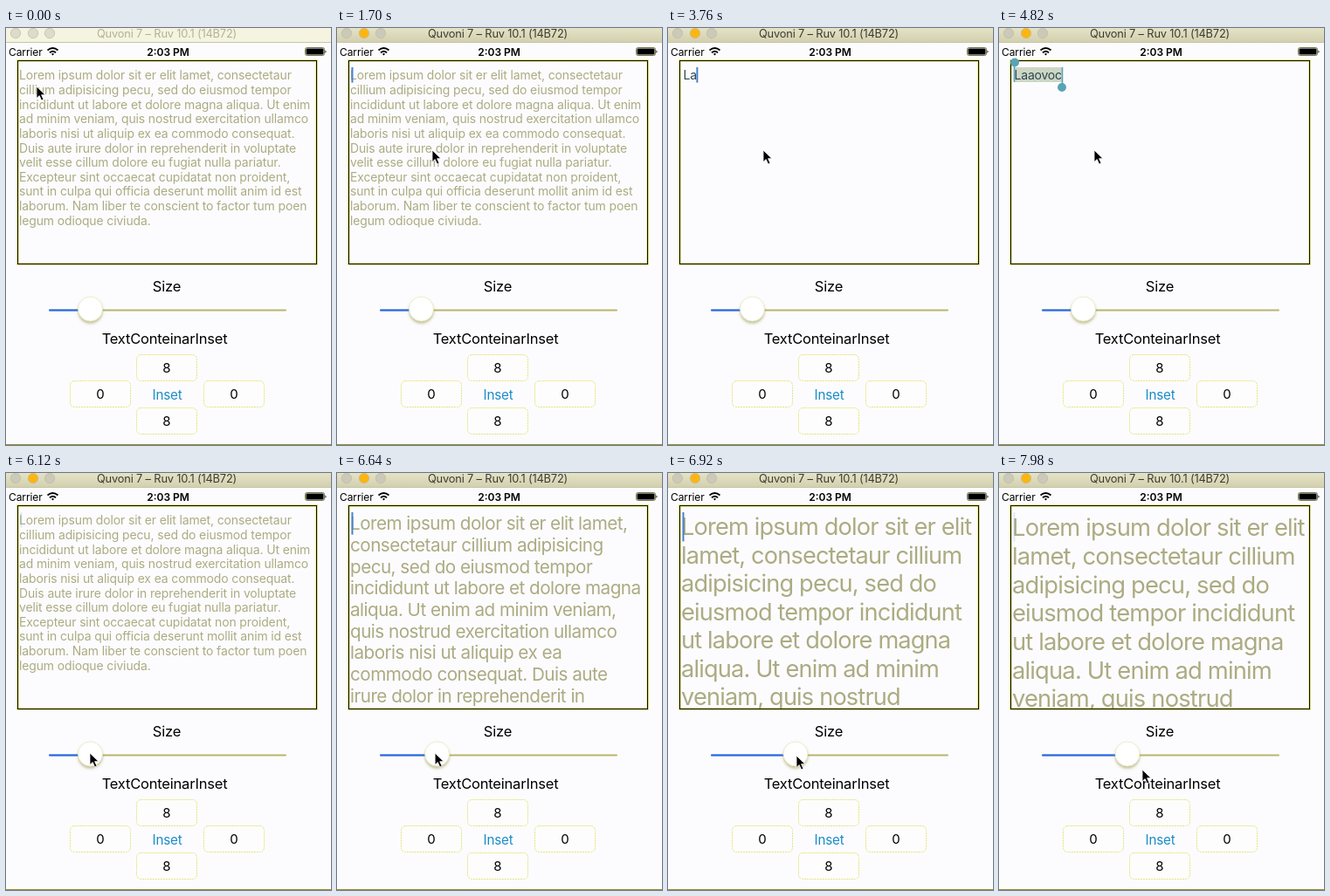
Write an HTML page that moves like this. It is 372 px wide and 478 px high and loops after 8 s.

```html
<!DOCTYPE html>
<html lang="en">
<head>
<meta charset="utf-8">
<title>Text view demo</title>
<style>
html, body { margin: 0; width: 100%; height: 100%; overflow: hidden; background: #fcfcfe; }
svg { position: absolute; left: 0; top: 0; }
text { font-family: Inter, sans-serif; }
.label { font-size: 16.5px; letter-spacing: -.012em; text-anchor: middle; }
.value { font-size: 15px; text-anchor: middle; }
text.japanese { font-family: "Noto Sans CJK JP", "Noto Sans CJK", sans-serif; }
.candidate { font-size: 20px; text-anchor: middle; }
.field { fill: #fdfdfd; stroke: #e4e482; stroke-dasharray: 2 1; }
#view { position: absolute; left: 14px; top: 39px; width: 341px; height: 231px; overflow: hidden; }
#placeholder { position: absolute; left: 1px; top: 7.4px; width: 338px; color: #acab82;
  font-family: Inter, sans-serif; line-height: 1.193; }
</style>
</head>
<body>
<svg width="372" height="478" viewBox="0 0 372 478">
  <defs>
    <linearGradient id="bar" x2="0" y2="1">
      <stop stop-color="#e5e3c6"/><stop offset="1" stop-color="#d2d0ae"/>
    </linearGradient>
    <filter id="shadow" x="-50%" y="-50%" width="200%" height="200%">
      <feDropShadow dx="0" dy="2.5" stdDeviation="1.8" flood-color="#8a8838" flood-opacity=".5"/>
    </filter>
  </defs>

  <rect id="titleBar" width="372" height="16"/>
  <path d="M0 16.5H372" stroke="#c6c5a4"/>
  <g stroke="#bcbba4" stroke-width=".7">
    <circle class="light" cx="11" cy="6" r="5.7"/>
    <circle class="light" cx="31" cy="6" r="5.7"/>
    <circle class="light" cx="50" cy="6" r="5.7"/>
  </g>
  <text id="title" x="184" y="11" font-size="12.8" letter-spacing="-.15" text-anchor="middle">Quvoni 7 – Ruv 10.1 (14B72)</text>

  <text x="3" y="31.5" font-size="12" letter-spacing="-.1">Carrier</text>
  <g fill="none" stroke="#000" stroke-width="1.8">
    <path d="M47.5 25.5q6-5 12 0M50 28.3q3.5-3 7 0"/>
    <path d="M52 29.7q1.5-1.2 3 0L53.5 31.5z" fill="#000" stroke="none"/>
  </g>
  <text x="185.5" y="31.5" font-size="12" font-weight="600" text-anchor="middle">2:03 PM</text>
  <rect x="342.5" y="22.5" width="22" height="9" rx="2" fill="none" stroke="#77774a"/>
  <rect x="343.5" y="23.5" width="20" height="7" rx="1"/>
  <path d="M365.5 25.5q2 1.6 0 3.2z"/>

  <rect x="13.5" y="37.5" width="342" height="233" fill="none" stroke="#e2e27c" stroke-width="2.6"/>
  <rect x="13.5" y="37.5" width="342" height="233" fill="none" stroke="#0c0c00"/>

  <g id="composing">
    <rect x="18" y="45" width="14" height="17" fill="#d5dcc4"/>
    <text class="japanese" x="17.5" y="59" font-size="14">あ</text>
    <path d="M32.5 45V62.5" stroke="#3973dd" stroke-width="2"/>
    <rect x="18.5" y="63.5" width="311" height="40" fill="#fcfcfc" stroke="#d6d67c"/>
    <g class="candidate">
      <text class="japanese" x="62" y="90">あっ</text>
      <text class="japanese" x="153" y="90">アッ</text>
      <text class="japanese" x="242" y="90">会っ</text>
    </g>
    <path d="M305.5 81l3.5 3.5 3.5-3.5" fill="none" stroke="#222" stroke-width="1.4"/>
  </g>

  <rect id="selection" x="17" y="45" width="55.5" height="17" fill="#cdd6c4"/>
  <text id="typed" x="17.5" y="59" font-size="14" letter-spacing="-.2" fill="#2b4650"></text>
  <g id="handles" fill="#5aa3b6" stroke="#5aa3b6" stroke-width="1.6">
    <path d="M17.5 40V62M72.5 45V68"/>
    <circle cx="18" cy="39.5" r="4.2"/><circle cx="72" cy="68" r="4.2"/>
  </g>

  <text class="label" x="184" y="302">Size</text>
  <path d="M50 323.5H320" stroke="#b9b56c" stroke-width="2" stroke-linecap="round"/>
  <path id="filled" stroke="#1f66ff" stroke-width="2" stroke-linecap="round"/>
  <circle id="thumb" cy="322" r="14" fill="#fff" stroke="#e6e5b4" stroke-width=".7" filter="url(#shadow)"/>

  <text class="label" x="181.5" y="361.5">TextConteinarInset</text>
  <g id="fields"></g>
  <text class="label" x="184.5" y="425.5" style="font-size:15.2px" fill="#1a8cc8">Inset</text>
  <path d="M0 477.5H372" stroke="#8e8e34"/>
</svg>

<div id="view"><div id="placeholder"></div></div>

<svg width="372" height="478" viewBox="0 0 372 478">
  <path id="caret" stroke="#4781cf" stroke-width="2"/>
  <path id="pointer" d="M0 0V13.5L3.2 10.6 5.6 16 8 15 5.6 9.7H10z" stroke="#fff" stroke-width=".8"/>
</svg>

<script>
const LOOP = 8000, ACTIVATE = 1050, COMPOSE = 2500, LATIN = 3500, SELECT = 4500, CLEAR = 5150, DRAG = 6430;
const WORD = 'Laaovoc';
const $ = id => document.getElementById(id);
const show = (id, visible) => $(id).style.display = visible ? '' : 'none';

// Line breaks hold at the initial size; larger text wraps by width.
$('placeholder').textContent = `Lorem ipsum dolor sit er elit lamet, consectetaur
cillium adipisicing pecu, sed do eiusmod tempor
incididunt ut labore et dolore magna aliqua. Ut enim
ad minim veniam, quis nostrud exercitation ullamco
laboris nisi ut aliquip ex ea commodo consequat.
Duis aute irure dolor in reprehenderit in voluptate
velit esse cillum dolore eu fugiat nulla pariatur.
Excepteur sint occaecat cupidatat non proident,
sunt in culpa qui officia deserunt mollit anim id est
laborum. Nam liber te conscient to factor tum poen
legum odioque civiuda.`;

$('fields').innerHTML = [[149.5, 374.5, 8], [73.5, 404.5, 0], [226.5, 404.5, 0], [149.5, 435.5, 8]]
  .map(([x, y, value]) => `<rect class="field" x="${x}" y="${y}" width="69" height="30" rx="5"/>
    <text class="value" x="${x + 34.5}" y="${y + 20}">${value}</text>`).join('');

const pointerPath = [[0, 35, 67], [450, 35, 67], [1000, 65, 96], [1550, 109, 140], [5400, 109, 140],
  [6050, 96, 321], [DRAG, 96, 321], [6640, 112, 321], [6920, 147, 324], [7080, 148, 324],
  [7450, 148, 324], [7850, 164, 340], [LOOP, 164, 340]];
const thumbPath = [[0, 96.5], [DRAG, 96.5], [6640, 114.5], [6920, 146], [7080, 147], [LOOP, 147]];

function along(path, t) {
  const i = path.findIndex(p => p[0] > t);
  const [a, b] = [path[i - 1], path[i]];
  const k = (t - a[0]) / (b[0] - a[0]);
  return a.slice(1).map((v, j) => v + (b[j + 1] - v) * k);
}

function draw(t) {
  const active = t >= ACTIVATE;
  $('titleBar').setAttribute('fill', active ? 'url(#bar)' : '#f5f4e0');
  $('title').setAttribute('fill', active ? '#3c3b30' : '#b2b195');
  document.querySelectorAll('.light').forEach((light, i) =>
    light.setAttribute('fill', !active ? '#dddccb' : i === 1 ? '#ffb510' : '#cbc9b8'));

  const [thumbX] = along(thumbPath, t);
  $('thumb').setAttribute('cx', thumbX);
  $('filled').setAttribute('d', `M50 323.5H${thumbX}`);

  const size = t < DRAG ? 13.93 : 10 + .207 * (thumbX - 63);
  const small = size < 16;
  Object.assign($('placeholder').style, {
    fontSize: size + 'px',
    letterSpacing: (small ? -.0075 : -.01 - .00076 * size) + 'em',
    whiteSpace: small ? 'pre' : 'normal'
  });

  const empty = t < COMPOSE || t >= CLEAR;
  const selected = t >= SELECT && t < CLEAR;
  const count = empty || t < LATIN ? 0 : Math.min(WORD.length, Math.floor((t - LATIN) / 110));
  show('placeholder', empty);
  show('composing', t >= COMPOSE && t < LATIN);
  show('selection', selected);
  show('handles', selected);
  $('typed').textContent = WORD.slice(0, count);

  const blink = (t - 1400 + LOOP) % 1000;
  const caretX = count ? 18 + $('typed').getComputedTextLength() : 17.5;
  $('caret').setAttribute('d', `M${caretX} 45v${size * 1.193 + 1}`);
  $('caret').style.opacity = Math.max(.15, Math.min(1, (570 - blink) / 40));
  show('caret', t >= 1300 && !selected && !(t >= COMPOSE && t < LATIN));

  $('pointer').setAttribute('transform', `translate(${along(pointerPath, t)})`);
}

const start = performance.now();
function tick() {
  draw((performance.now() - start) % LOOP);
  requestAnimationFrame(tick);
}
tick();
</script>
</body>
</html>
```
